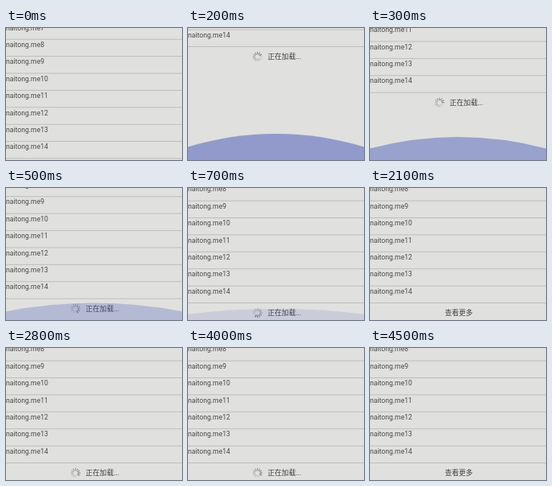
An HTML page that plays this animation: 221 by 166 pixels, repeating every 5.1 s.

```html
<!DOCTYPE html>
<html lang="zh">
<head>
<meta charset="utf-8">
<title>List with load more</title>
<style>
  html, body { margin: 0; width: 100%; height: 100%; overflow: hidden; background: #e0e0de; }
  svg { display: block; width: 100vw; height: 100vh; }
  text { font: 8.65px Roboto, "Noto Sans CJK SC", "Noto Sans CJK", sans-serif; fill: #4a4a4a; }
  .footer text { font-size: 8.8px; fill: #404040; }
</style>
</head>
<body>
<svg viewBox="0 0 221 166">
  <g id="list">
    <g id="rows"></g>
    <g class="footer">
      <text id="more" x="111.5" y="15.5" text-anchor="middle">查看更多</text>
      <g id="loading">
        <g id="spinner"></g>
        <text x="100" y="15.5">正在加载...</text>
      </g>
    </g>
  </g>
  <path id="glow" fill="#4a5bb9"/>
</svg>
<script>
const W = 221, H = 166, LOOP = 5100, STEP = 100;
const ROWS = 14, PITCH = 21.4, REST = 144.5, PULL = 121, SPOKES = 12;
const $ = id => document.getElementById(id);

function add(parent, tag, attrs, text = '') {
  const el = document.createElementNS('http://www.w3.org/2000/svg', tag);
  for (const key in attrs) el.setAttribute(key, attrs[key]);
  el.textContent = text;
  parent.append(el);
  return el;
}

// Rows are placed upwards from the line that closes the list.
for (let i = 1; i <= ROWS; i++) {
  const y = (i - ROWS) * PITCH;
  add($('rows'), 'text', { x: 0, y: y - 11.7 }, 'naitong.me' + i);
  add($('rows'), 'rect', { x: 0, y: y - 0.5, width: W, height: 1, fill: '#bdbdbc' });
}

const spokes = Array.from({ length: SPOKES }, (_, i) => add($('spinner'), 'line', {
  x1: 0, y1: -3.2, x2: 0, y2: -5.7, stroke: '#666', 'stroke-width': 1.15,
  'stroke-linecap': 'round',
  transform: `translate(87.3 12.6) rotate(${i * 360 / SPOKES})`
}));

// Position of the closing line: drag up, then a decelerating return.
function listEnd(n) {
  if (n < 2) return n ? 96 : 164;
  const left = Math.max(0, 1 - (n - 2) / 4);
  return REST - PULL * left ** 2.25;
}

// Height and opacity of the overscroll glow.
function glowAt(n) {
  if (n < 1) return [0, 0];
  if (n === 1) return [20, 0.35];
  const left = Math.max(0, 1 - (n - 3) / 9);
  return [29 * left ** 1.2, Math.min(0.52, 0.47 * left * left)];
}

function draw(time) {
  const n = Math.floor(time % LOOP / STEP);
  $('list').setAttribute('transform', `translate(0 ${listEnd(n)})`);

  const busy = n >= 2 && n < 21 || n >= 26 && n < 45;
  $('loading').style.display = busy ? '' : 'none';
  $('more').style.display = busy ? 'none' : '';
  spokes.forEach((spoke, i) => {
    const age = (n - i + 5 * SPOKES) % SPOKES;
    spoke.setAttribute('stroke-opacity', 0.85 - 0.7 * age / (SPOKES - 1));
  });

  const [height, alpha] = glowAt(n);
  const top = H - height, side = H - height * 0.5;
  $('glow').setAttribute('d', `M0 ${H}V${side}Q${W / 2} ${2 * top - side} ${W} ${side}V${H}Z`);
  $('glow').setAttribute('fill-opacity', alpha);
}

const start = performance.now();
function tick() {
  draw(performance.now() - start);
  requestAnimationFrame(tick);
}
tick();
</script>
</body>
</html>
```
